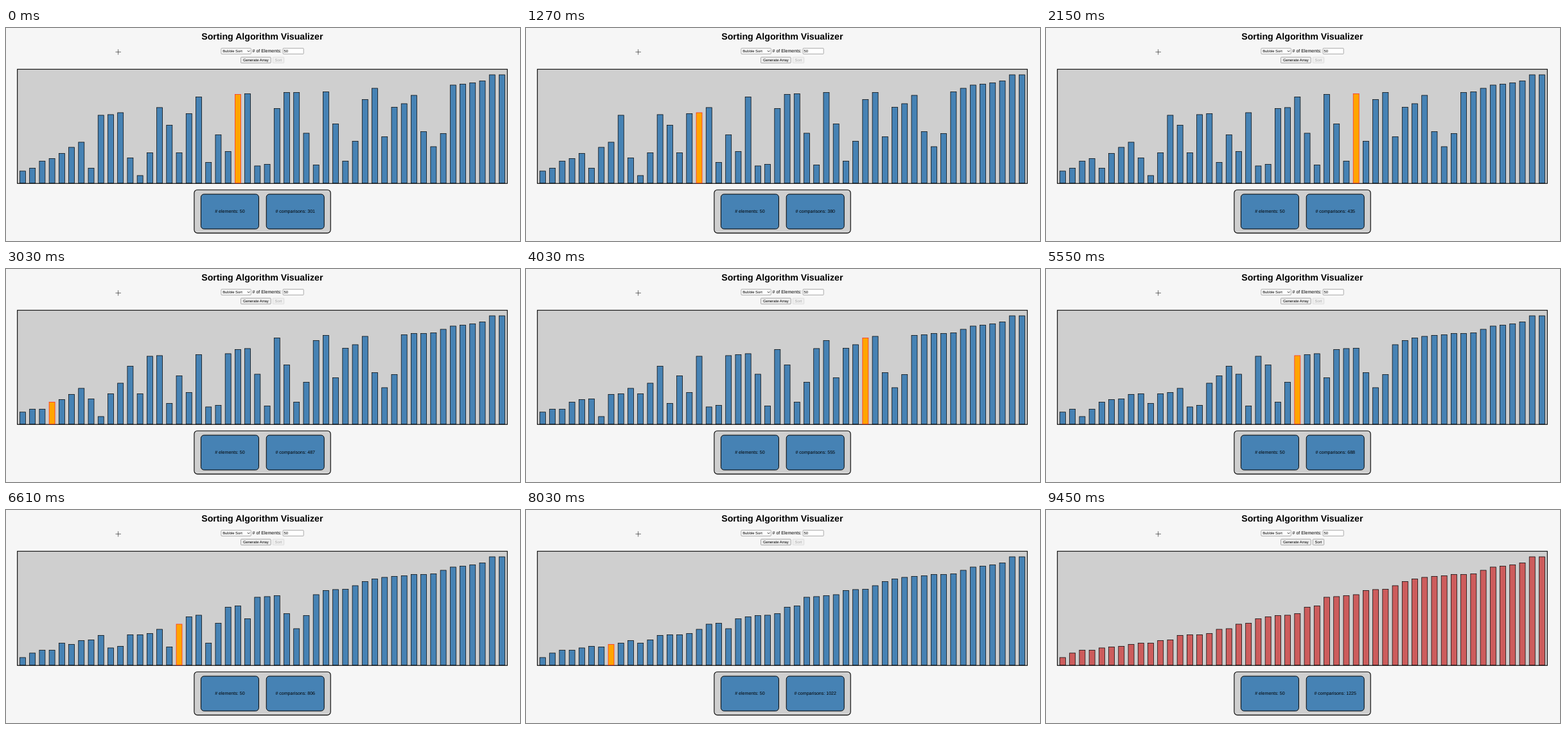
An HTML page for the animation above (9.7 s loop, 800 by 332 pixels).

```html
<!DOCTYPE html>
<html lang="en">
<head>
<meta charset="utf-8">
<title>Sorting Algorithm Visualizer</title>
<style>
  html, body { margin: 0; width: 100%; height: 100%; overflow: hidden; background: #f6f6f6; }
  svg {
    display: block; width: 800px; height: 332px;
    font: 7.07px Arial, "Liberation Sans", sans-serif;
    text-rendering: geometricPrecision;
  }
  .title { font-size: 14.13px; font-weight: bold; }
  .form { font-size: 5.89px; }
  .mid { text-anchor: middle; }
  .field { fill: #fff; stroke: #767676; stroke-width: .6; }
  .button { fill: #efefef; stroke: #767676; stroke-width: .6; }
  .off .button { stroke: #cfcfcf; }
  .off text { fill: #aaa; }
  .box { fill: #cfcfcf; stroke: #000; stroke-width: 1.1; }
  .card { fill: #4682b4; stroke: #000; stroke-width: 1; }
  #bars { stroke: #000; stroke-width: .72; fill: #4682b4; }
  #bars .active { fill: #ffa500; stroke: #f22; }
  #bars .done { fill: #cd5c5c; }
</style>
</head>
<body>
<svg viewBox="0 0 800 332">
  <text class="title mid" x="398.9" y="18.2">Sorting Algorithm Visualizer</text>
  <path d="M170.5 37.4h8.4M174.6 33.2v8.4" stroke="#333" stroke-width=".7"/>

  <rect class="field" x="334.9" y="31.6" width="46.4" height="8.9" rx="1"/>
  <text class="form" x="337.2" y="38.2">Bubble Sort</text>
  <path d="M375.8 35.2l1.8 1.8 1.8-1.8" fill="none" stroke="#111" stroke-width=".9"/>
  <text x="383.5" y="38.4"># of Elements:</text>
  <rect class="field" x="431.2" y="31.6" width="32" height="8.9" rx=".8"/>
  <text class="form" x="432.6" y="38.2">50</text>

  <rect class="button" x="365.5" y="45.4" width="46.7" height="9.2" rx="1.2"/>
  <text class="form mid" x="388.9" y="52.1">Generate Array</text>
  <g id="sort" class="off">
    <rect class="button" x="415.3" y="45.4" width="17.4" height="9.2" rx="1.2"/>
    <text class="form mid" x="424" y="52.1">Sort</text>
  </g>

  <rect class="box" x="17.7" y="64.3" width="762.6" height="178"/>
  <g id="bars"></g>

  <rect class="box" x="292.9" y="252.2" width="212.3" height="67.4" rx="5"/>
  <rect class="card" x="303.4" y="259" width="90" height="54.2" rx="4.8"/>
  <rect class="card" x="405.2" y="259" width="90" height="54.2" rx="4.8"/>
  <text class="mid" x="348.4" y="288.4">&#35; elements: 50</text>
  <text class="mid" id="count" x="450.2" y="288.4"></text>
</svg>
<script>
const LOOP = 9700, STEP = 25.6, BASE = 241.8;
const TOTAL = 1225;

// Bar tops at the start of the loop, partway through pass 6.
const tops = [
  222.5, 218, 207, 203, 195, 185.5, 177.5, 218, 135.5, 134.5,
  131.5, 202, 229.5, 194, 123.5, 151, 194, 133, 107, 209,
  166, 192, 103, 102, 214.5, 212, 125, 100, 100, 163.5,
  213, 99, 149, 207, 176, 111, 93.5, 169, 123, 117.5,
  104.5, 161, 184.5, 164, 88.5, 87, 85, 82, 72.5, 72.5
];

// Only swaps take time, so one state is kept per swap.
function bubbleStates(a, pass, pos, count) {
  const states = [{ count, pos, tops: [...a] }];
  for (let i = pass; i < a.length - 1; i++) {
    for (let j = i === pass ? pos : 0; j < a.length - 1 - i; j++) {
      count++;
      if (a[j] < a[j + 1]) {
        [a[j], a[j + 1]] = [a[j + 1], a[j]];
        states.push({ count, pos: j + 1, tops: [...a] });
      }
    }
  }
  return states;
}

const states = bubbleStates([...tops], 6, 22, 301);
const last = states.length - 1;

// Pace: time in ms against comparisons made.
const pace = [[0, 301], [1270, 380], [3030, 487], [4030, 555], [5550, 688], [6610, 806]]
  .map(([t, n]) => [t, states.filter(s => s.count <= n).length - 1]);
const [lateTime, lateSwap] = pace[pace.length - 1];
const sortEnd = lateTime + (last - lateSwap + .5) * STEP;

function swapAt(t) {
  for (let i = 1; i < pace.length; i++) {
    const [t0, k0] = pace[i - 1], [t1, k1] = pace[i];
    if (t < t1) return Math.round(k0 + (k1 - k0) * (t - t0) / (t1 - t0));
  }
  return Math.min(last, Math.round(lateSwap + (t - lateTime) / STEP));
}

const byId = id => document.getElementById(id);
const sortButton = byId('sort'), counter = byId('count');
const bars = tops.map((_, i) => {
  const r = document.createElementNS('http://www.w3.org/2000/svg', 'rect');
  r.setAttribute('x', (21.45 + i * 15.224).toFixed(2));
  r.setAttribute('width', 9);
  return byId('bars').appendChild(r);
});

function draw(t) {
  const sorted = t >= sortEnd;
  const state = states[sorted ? last : swapAt(t)];
  const done = sorted ? Math.floor((t - sortEnd) / STEP) + 1 : 0;
  bars.forEach((bar, i) => {
    const y = state.tops[i] + .45;
    bar.setAttribute('y', y);
    bar.setAttribute('height', BASE - y);
    bar.setAttribute('class', i < done ? 'done' : !sorted && i === state.pos ? 'active' : '');
  });
  counter.textContent = '# comparisons: ' + (sorted ? TOTAL : state.count);
  sortButton.setAttribute('class', sorted ? '' : 'off');
}

const start = performance.now();
function tick() {
  draw((performance.now() - start) % LOOP);
  requestAnimationFrame(tick);
}
tick();
</script>
</body>
</html>
```
